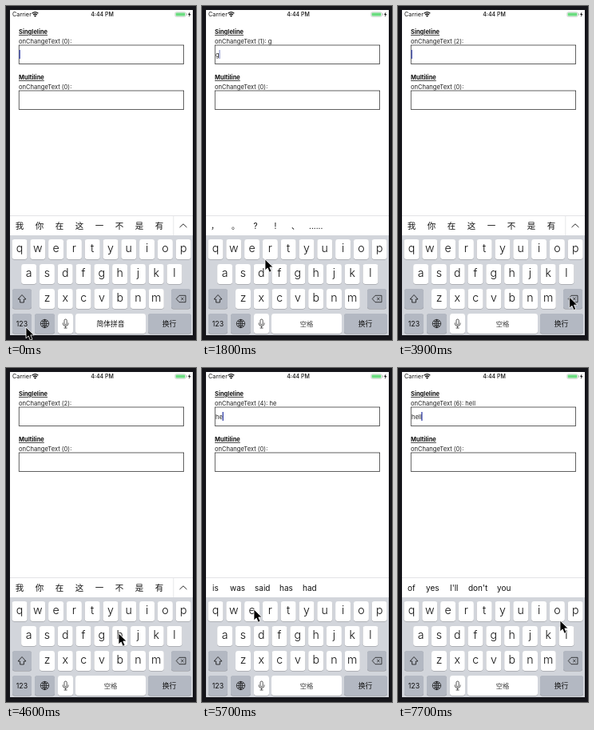
Write an HTML page that moves like this. It is 238 by 418 pixels and loops after 8000 ms.

```html
<!DOCTYPE html>
<html lang="en">
<head>
<meta charset="utf-8">
<title>Text input</title>
<style>
html, body { margin: 0; width: 100%; height: 100%; overflow: hidden; background: #15151a; }
svg { display: block; width: 100vw; height: 100vh; font-family: Inter, "Noto Sans CJK SC", "Noto Sans CJK", sans-serif; fill: #111; }
text { white-space: pre; }
</style>
</head>
<body>
<script>
const LOOP = 8000, STEP = 100;
const INK = '#111', WHITE = '#fff', GREY = '#b3b8c2';

// [time, change count, field text, suggestion bar]
const EDITS = [
  [-400, 0, '', 'hanzi'], [1200, 1, 'g', 'marks'], [3800, 2, '', 'hanzi'],
  [4900, 3, 'h', 'marks'], [5600, 4, 'he', 'verbs'], [6900, 5, 'hel', 'marks'],
  [7300, 6, 'hell', 'words']
];
// [start, end, key]
const PRESSES = [
  [1100, 1300, 'g'], [3700, 3900, 'delete'], [4800, 5000, 'h'],
  [5400, 5600, 'e'], [6800, 6900, 'l'], [7200, 7400, 'l']
];
// [time, x, y] of the pointer tip
const POINTER = [
  [0, 25, 402], [100, 26, 401], [800, 127, 338], [1400, 127, 338], [1600, 83, 327],
  [1700, 83, 327], [1800, 79, 317], [2000, 72, 313], [2700, 72, 313], [2800, 250, 372],
  [3200, 250, 372], [3300, 237.3, 371], [3600, 216, 374], [4100, 214, 359],
  [4200, 214, 358], [4600, 141, 332], [5100, 141, 332], [5600, 65, 302],
  [6000, 65, 302], [6600, 206, 332], [7200, 206, 332], [7400, 203, 333],
  [7500, 203, 333], [7700, 203, 316], [8000, 203, 316]
];
// [text, x, anchor]
const BARS = {
  hanzi: [...'我你在这一不是有'].map((c, i) => [c, 17 + 25 * i, 'middle']),
  marks: [['，', 11], ['。', 37], ['?', 67, 'middle'], ['!', 92, 'middle'], ['、', 112], ['......', 134]],
  verbs: [['is', 13], ['was', 35], ['said', 66], ['has', 97], ['had', 126]],
  words: [['of', 12], ['yes', 35], ["I'll", 65], ["don't", 88], ['you', 124]]
};

function add(parent, tag, attrs = {}, content = '') {
  const node = document.createElementNS('http://www.w3.org/2000/svg', tag);
  for (const name in attrs) node.setAttribute(name, attrs[name]);
  node.textContent = content;
  return parent.appendChild(node);
}
const rect = (parent, x, y, width, height, fill, more) =>
  add(parent, 'rect', { x, y, width, height, fill, ...more });
const label = (parent, content, x, y, size, more) =>
  add(parent, 'text', { x, y, 'font-size': size, ...more }, content);
const line = (parent, d, width = 1, more) =>
  add(parent, 'path', { d, fill: 'none', stroke: INK, 'stroke-width': width, ...more });
const CENTER = { 'text-anchor': 'middle' };

const svg = add(document.body, 'svg', { viewBox: '0 0 238 418', preserveAspectRatio: 'none' });
rect(svg, 5, 5, 229, 407, WHITE);

// Status bar
label(svg, 'Carrier', 8, 13, 7.3);
line(svg, 'M32.7 9.3Q36.5 6 40.3 9.3M34.1 11Q36.5 9 38.9 11', 1.3);
add(svg, 'path', { d: 'M35 12.2Q36.5 11 38 12.2L36.5 13.8Z' });
label(svg, '4:44 PM', 120.5, 13, 7, { ...CENTER, 'font-weight': 500 });
rect(svg, 211.8, 7.6, 13.4, 5.8, WHITE, { rx: 1.6, stroke: '#aaa', 'stroke-width': .5 });
rect(svg, 212.6, 8.4, 11.8, 4.2, '#6bdc80', { rx: 1 });
rect(svg, 226, 9.3, .8, 2.4, '#aaa');
add(svg, 'path', { d: 'M230.4 7.3L228 11H229.5L228.9 14L231.4 10H229.9Z' });

// Form
function field(title, top) {
  label(svg, title, 16, top + 7, 7.5, { 'font-weight': 700, 'text-decoration': 'underline' });
  rect(svg, 16.2, top + 21, 206.5, 23.5, 'none', { stroke: '#000', 'stroke-width': .62 });
  return label(svg, 'onChangeText (0):', 16, top + 19, 7.6, { fill: '#222' });
}
const changeLabel = field('Singleline', 28);
field('Multiline', 85);
const input = label(svg, '', 17, 63.5, 7.5, { fill: '#222' });
const caret = rect(svg, 17, 55, 1.3, 11, '#3340a8');

// Suggestions
rect(svg, 5, 262, 229, .8, '#dcdde0');
const bars = {};
for (const name in BARS) {
  const bar = bars[name] = add(svg, 'g');
  const size = name === 'hanzi' ? 10.5 : 10;
  for (const [content, x, anchor = 'start'] of BARS[name])
    label(bar, content, x, 279, size, { 'text-anchor': anchor });
}
rect(bars.hanzi, 209.5, 263, .7, 24, '#dcdde0');
line(bars.hanzi, 'M217.5 277L222 272.8L226.5 277', .9);

// Keyboard
rect(svg, 5, 287, 229, 125, '#d2d5db');
const keys = {};
function key(x, y, width, fill) {
  rect(svg, x, y + .6, width, 25, '#8b8d92', { rx: 3 });
  return rect(svg, x, y, width, 25, fill, { rx: 3 });
}
['qwertyuiop', 'asdfghjkl', 'zxcvbnm'].forEach((row, r) => {
  [...row].forEach((char, i) => {
    const x = [17, 28.6, 51.5][r] + 22.8 * i, y = 292 + 31 * r;
    key(x - 9.5, y, 19, WHITE);
    label(svg, char, x, y + 16.3, 14.2, { ...CENTER, 'font-weight': 300 });
    keys[char] = { x, y };
  });
});
key(8, 354, 24, GREY);
const deleteKey = key(207, 354, 24, GREY);
key(8, 385, 24, GREY);
key(36, 385, 25, GREY);
key(65, 385, 19, WHITE);
key(87, 385, 88, WHITE);
key(178, 385, 54, GREY);

line(svg, 'M20 361.5L25 367H22.4V371H17.6V367H15Z', .8, { 'stroke-linejoin': 'round' });
line(svg, 'M213.3 366.5L217 362.3H225V370.7H217ZM219.2 364.8L222.6 368.2M222.6 364.8L219.2 368.2', .75);
label(svg, '123', 20, 401, 8.8, CENTER);
line(svg, 'M43.3 397.5A5.2 5.2 0 1 1 53.7 397.5A5.2 5.2 0 1 1 43.3 397.5H53.7' +
  'M48.5 392.3V402.7M48.5 392.3Q43.6 397.5 48.5 402.7Q53.4 397.5 48.5 392.3' +
  'M44.7 394.4Q48.5 396.3 52.3 394.4M44.7 400.6Q48.5 398.7 52.3 400.6', .7);
rect(svg, 73, 392, 3.2, 6.8, 'none', { rx: 1.6, stroke: INK, 'stroke-width': .7 });
line(svg, 'M71.2 396.5V397.5Q71.3 400.5 74.6 400.5T78 397.5V396.5M74.6 400.5V403M72.6 403H76.6', .7);
const modeName = label(svg, '简体拼音', 131, 400.8, 8.8, CENTER);
const spaceName = label(svg, '空格', 131, 400.8, 8.4, { ...CENTER, fill: '#444' });
label(svg, '换行', 204.5, 400.8, 8.8, CENTER);

// Enlarged key shown while pressed
const balloon = add(svg, 'g');
add(balloon, 'path', {
  d: 'M-13.5-36H13.5Q17.5-36 17.5-32V-10C17.5-3 9.5-3 9.5 4V22Q9.5 25 6.5 25H-6.5Q-9.5 25-9.5 22V4C-9.5-3-17.5-3-17.5-10V-32Q-17.5-36-13.5-36Z',
  fill: WHITE, stroke: '#b4b7bd', 'stroke-width': .6
});
const balloonChar = label(balloon, '', 0, -12, 21, { ...CENTER, 'font-weight': 300 });

const pointer = add(svg, 'path', {
  d: 'M0 0V13.8L3.2 10.9L5.4 16.2L8 15.1L5.8 9.9H10.1Z',
  fill: '#000', stroke: WHITE, 'stroke-width': .8, 'stroke-linejoin': 'round'
});

const clamp = v => Math.max(0, Math.min(1, v));
const ease = v => v * v * (3 - 2 * v);

function pointerAt(t) {
  const i = POINTER.findIndex(p => p[0] > t);
  const [t0, x0, y0] = POINTER[i - 1], [t1, x1, y1] = POINTER[i];
  if (x1 === 250) return [x0, y0];
  const k = ease((t - t0) / (t1 - t0));
  return [x0 + (x1 - x0) * k, y0 + (y1 - y0) * k];
}

function caretAlpha(elapsed) {
  if (elapsed < 600) return 1;
  const phase = (elapsed - 100) % 1000;
  return phase === 0 || phase === 500 ? .5 : phase < 500 ? 1 : 0;
}

function draw(t) {
  const [since, count, value, barName] = EDITS.filter(e => e[0] <= t).pop();
  changeLabel.textContent = `onChangeText (${count}): ${value}`;
  input.textContent = value;
  caret.setAttribute('x', value ? 17 + input.getComputedTextLength() - .2 : 16.5);
  caret.setAttribute('opacity', caretAlpha(t - since));
  for (const name in bars) bars[name].style.display = name === barName ? '' : 'none';

  const fade = clamp((t - 200) / 500);
  modeName.setAttribute('opacity', 1 - fade);
  spaceName.setAttribute('opacity', fade);

  const press = PRESSES.find(([start, end]) => t >= start && t < end);
  const pressed = press && press[2];
  const spot = keys[pressed];
  deleteKey.setAttribute('fill', pressed === 'delete' ? WHITE : GREY);
  balloon.style.display = spot ? '' : 'none';
  if (spot) {
    balloon.setAttribute('transform', `translate(${spot.x} ${spot.y})`);
    balloonChar.textContent = pressed;
  }
  pointer.setAttribute('transform', `translate(${pointerAt(t)})`);
}

const begin = performance.now();
function tick() {
  const t = (performance.now() - begin) % LOOP;
  draw(Math.floor(t / STEP) * STEP);
  requestAnimationFrame(tick);
}
tick();
</script>
</body>
</html>
```
